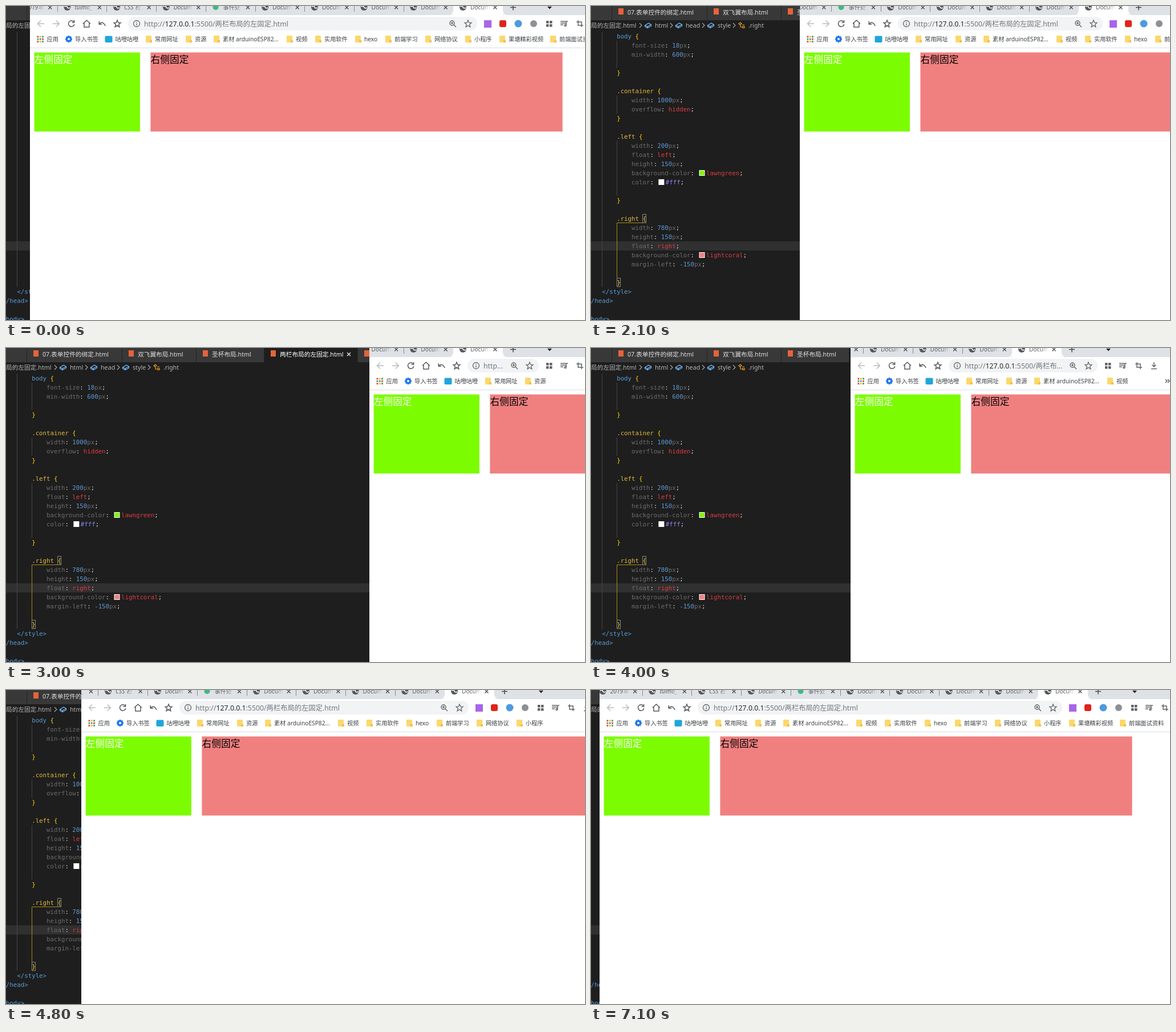
An HTML page with a canvas that plays this animation: 1015x551 px, repeating every 7200 ms.

```html
<!DOCTYPE html>
<html lang="zh">
<head>
<meta charset="utf-8">
<title>两栏布局</title>
<style>
html, body { margin: 0; width: 100%; height: 100%; overflow: hidden; background: #fff; }
canvas { display: block; }
</style>
</head>
<body>
<canvas id="stage" width="1015" height="551"></canvas>
<script>
const W = 1015, H = 551, LOOP = 7200, STEP = 100;
const ctx = document.getElementById('stage').getContext('2d');
const SANS = '"Noto Sans", "Noto Sans CJK SC", sans-serif';
const MONO = '"DejaVu Sans Mono", monospace';

// Left edge of the browser window: [time, x]
const EDGE = [
  [0, 42], [800, 42], [900, 28], [1000, 28], [1100, 42], [1300, 112], [1400, 141], [1600, 141],
  [1700, 155], [1800, 187], [1900, 235], [2000, 295], [2100, 366], [2200, 370], [2400, 373],
  [2500, 400], [2900, 625], [3000, 637], [3600, 637], [4000, 455], [4400, 229],
  [4700, 147], [4800, 132], [5200, 59], [5500, 47], [5600, 40], [6000, 2], [7000, 2], [7100, 15], [7200, 42]
];

function edgeAt(t) {
  const i = Math.max(1, EDGE.findIndex(k => k[0] >= t));
  const [t0, a] = EDGE[i - 1], [t1, b] = EDGE[i];
  return Math.round(a + (b - a) * (t - t0) / (t1 - t0));
}

// While the edge is dragged, right-aligned parts trail by one step
function lagAt(t) {
  const x = edgeAt(t);
  if (t < STEP || t >= 7000 || edgeAt(t + STEP) === x) return 0;
  return x - edgeAt(t - STEP);
}

function rect(x, y, w, h, color) {
  ctx.fillStyle = color;
  ctx.fillRect(x, y, w, h);
}

function text(s, x, y, size, color, font = SANS, style = '') {
  ctx.font = `${style} ${size}px ${font}`;
  ctx.fillStyle = color;
  ctx.fillText(s, x, y);
  return x + ctx.measureText(s).width;
}

function dot(x, y, r, color) {
  ctx.fillStyle = color;
  ctx.beginPath();
  ctx.arc(x, y, r, 0, 7);
  ctx.fill();
}

function pill(x, y, w, h, r, color) {
  ctx.fillStyle = color;
  ctx.beginPath();
  ctx.roundRect(x, y, w, h, r);
  ctx.fill();
}

function stroke(d, x, y, color, width = 1.5) {
  ctx.save();
  ctx.translate(x, y);
  ctx.strokeStyle = color;
  ctx.lineWidth = width;
  ctx.stroke(new Path2D(d));
  ctx.restore();
}

function clipped(x, y, w, h, draw) {
  ctx.save();
  ctx.beginPath();
  ctx.rect(x, y, w, h);
  ctx.clip();
  draw();
  ctx.restore();
}

const ICON = {
  back: 'M6 0H-5M0 -5.5L-5.5 0L0 5.5',
  forward: 'M-6 0H5M0 -5.5L5.5 0L0 5.5',
  reload: 'M4 -3.5A5.2 5.2 0 1 0 5.2 1M5 -6V-2H1',
  home: 'M-6.5 0L0 -6L6.5 0M-4.5 -1V6H4.5V-1',
  undo: 'M-5 -4V1H0M-5 1Q1 -6 6 4',
  star: 'M0 -6L1.8 -1.8L6 -1.6L2.7 1.3L3.8 5.7L0 3.2L-3.8 5.7L-2.7 1.3L-6 -1.6L-1.8 -1.8Z',
  info: 'M5.5 0A5.5 5.5 0 1 1 -5.5 0A5.5 5.5 0 1 1 5.5 0M0 -.5V3M0 -3V-1.8',
  zoom: 'M3 -1A4 4 0 1 1 -5 -1A4 4 0 1 1 3 -1M2 2L6 6M-3 -1H1M-1 -3V1',
  list: 'M-6 -4H3M-6 -1H3M-6 2H-1M4 3V-4H7M4 3A1.5 1.5 0 1 1 1 3A1.5 1.5 0 1 1 4 3',
  crop: 'M-3 -6V3H6M-6 -3H3V6',
  download: 'M0 -6V2M-3.5 -1.5L0 2L3.5 -1.5M-5 5.5H5',
  close: 'M-3 -3L3 3M3 -3L-3 3',
  plus: 'M-5 0H5M0 -5V5',
  chevron: 'M-2 -4L2 0L-2 4',
  more: 'M-3 -3L0 0L-3 3M1 -3L4 0L1 3',
  cube: 'M-5.5 0L1 -4L5.5 -1.5V1L-1 4.5L-5.5 2ZM-5.5 0L-1 2L5.5 -1.5M-1 2V4.5',
  rule: 'M-5 -3L-2 -5L0 -3L-3 -1ZM-2 -1V3H2M1 -1H5M2 1.5H5V4.5H2Z'
};

/* ---------- editor ---------- */

const COL = 6.47, colX = c => c * COL - 6.6, rowY = r => 45 + r * 16;
const CODE = `        body {
            font-size: 18px;
            min-width: 600px;

        }

        .container {
            width: 1000px;
            overflow: hidden;
        }

        .left {
            width: 200px;
            float: left;
            height: 150px;
            background-color: lawngreen;
            color: #fff;

        }

        .right {
            width: 780px;
            height: 150px;
            float: right;
            background-color: lightcoral;
            margin-left: -150px;

        }
    </style>
</head>

<body>`.split('\n');

function codeLine(line, row) {
  const y = rowY(row) + 12;
  let x = colX(line.search(/\S/));
  const put = (s, color) => { x = text(s, x, y, 10.75, color, MONO); };
  const decl = line.match(/^\s*([\w-]+)(: )(.*);$/);
  if (decl) {
    const [, prop, colon, value] = decl;
    put(prop, '#6c6c6c');
    put(colon, '#d4d4d4');
    if (prop.includes('color')) {
      rect(x + 2, y - 9, 10, 10, '#fff');
      rect(x + 3, y - 8, 8, 8, value);
      x += 14.5;
    }
    const num = value.match(/^(-?\d+)(px)$/);
    if (num) {
      put(num[1], '#5f9ad6');
      put(num[2], '#6c6c6c');
    } else {
      put(value, value[0] === '#' ? '#8a86f5' : '#dc3c42');
    }
    put(';', '#d4d4d4');
  } else if (/[<>]/.test(line)) {
    put(line.trim(), '#569cd6');
  } else if (line.includes('{')) {
    const name = line.trim().slice(0, -1);
    put(name, name[0] === '.' ? '#e0b83c' : '#569cd6');
    put('{', '#ffd700');
  } else if (line) {
    put('}', '#ffd700');
  }
}

function editorTab(x, w, label, active) {
  rect(x, 0, w, 25, active ? '#1e1e1e' : '#383838');
  rect(x + 11, 4, 9, 11, '#e5633a');
  text(label, x + 27, 15, 10.7, active ? '#fff' : '#dedede');
  if (active) stroke(ICON.close, x + w - 15, 11, '#eee', 1.2);
}

function editor() {
  rect(0, 0, W, H, '#1e1e1e');
  rect(0, 0, W, 25, '#252526');
  rect(0, 0, 36, 25, '#383838');
  editorTab(37, 166, '07.表单控件的绑定.html');
  editorTab(204, 129, '双飞翼布局.html');
  editorTab(334, 118, '圣杯布局.html');
  editorTab(453, 163, '两栏布局的左固定.html', true);
  editorTab(617, 160, '');

  text('局的左固定.html', 0, 38, 10.7, '#b4b4b4');
  [['html', 112], ['head', 166], ['style', 222], ['.right', 276]].forEach(([s, x], i) => {
    stroke(ICON.chevron, x - 25, 34, '#aaa', 1.1);
    stroke(i < 3 ? ICON.cube : ICON.rule, x - 12, 34, i < 3 ? '#75beff' : '#ee9d28', 1.2);
    text(s, x, 38, 10.7, '#b4b4b4');
  });

  rect(0, rowY(23), W, 16, '#303031');
  rect(19, 45, 1, 448, '#454545');
  [[1, 3], [7, 2], [12, 6]].forEach(([r, n]) => rect(45, rowY(r), 1, n * 16, '#454545'));
  stroke(`M97 380.5H45.5V${rowY(27)}`, 0, 0, '#a88a12', 1);
  [[90, 20], [45, 27]].forEach(([x, r]) => stroke('M.5 .5H6.5V15.5H.5Z', x, rowY(r), '#888', 1));
  CODE.forEach(codeLine);
}

/* ---------- browser ---------- */

const STRIP = '#dee1e6', INK = '#5f6368';
const TABS = ['2019年', 'tulmo_', 'CSS 栏', 'Docum', '事件处', 'Docum', 'Docum', 'Docum', 'Docum', 'Docum'];
const MARKS = [
  ['常用网址', 203], ['资源', 273], ['素材 arduinoESP82...', 322], ['视频', 450], ['实用软件', 500],
  ['hexo', 570], ['前端学习', 623], ['网络协议', 693], ['小程序', 763], ['果塘精彩视频', 823], ['前端面试资料', 912]
];

function globe(x, y) {
  dot(x, y, 6, '#55595e');
  stroke('M-5 -1Q-1 -3 0 0T5 1M-1 -5Q1 -2 4 -3', x, y, '#fff', 1.5);
}

function tabStrip(left, lag) {
  rect(left, 0, W - left, 16, STRIP);
  TABS.forEach((label, i) => {
    const x = 33.7 + i * 86.7 + lag, active = i === TABS.length - 1;
    const bg = active ? '#fff' : STRIP;
    if (active) {
      rect(x - 30, 0, 87, 16, bg);
      stroke('M-34 15.5Q-30 15 -30 10M57 10Q57 15 61 15.5', x, 0, bg, 2);
    } else if (i < TABS.length - 2) {
      rect(Math.round(x + 56), 0, 1, 10, '#85898f');
    }
    if (i === 4) dot(x - 13, 2, 5, '#41b883');
    else globe(x - 13, 2);
    clipped(x, 0, 35, 14, () => text(label, x, 6, 10.2, INK, SANS, i < 4 ? 'italic' : ''));
    const fade = ctx.createLinearGradient(x + 20, 0, x + 35, 0);
    fade.addColorStop(0, bg + (active ? 'f' : 'ff').replace(/f/g, '0'));
    fade.addColorStop(1, bg);
    rect(x + 20, 0, 16, 14, fade);
    stroke(ICON.close, x + 43.5, 2.5, '#50545a', 1.4);
  });
  stroke(ICON.plus, 889 + lag, 2.5, '#45494e', 1.5);
  ctx.fillStyle = '#222';
  ctx.fill(new Path2D(`M${949 + lag} 1h8l-4 4.5z`));
}

function address(x, limit) {
  const parts = [['http://', '#73777c'], ['127.0.0.1', '#26282b'], [':5500/两栏布局的左固定.html', '#73777c']];
  ctx.font = `12.3px ${SANS}`;
  const width = s => ctx.measureText(s).width;
  const full = parts.map(p => p[0]).join('');
  let keep = full.length;
  if (x + width(full) > limit) {
    while (keep > 0 && x + width(full.slice(0, keep) + '...') > limit) keep--;
  }
  const cut = keep < full.length;
  for (const [s, color] of parts) {
    x = text(s.slice(0, Math.max(0, keep)), x, 35.5, 12.3, color);
    keep -= s.length;
  }
  if (cut) text('...', x, 35.5, 12.3, '#73777c');
}

function toolbar(left, lag) {
  const narrow = left - lag > 420;
  const zoomX = (narrow ? 891 : 783) + lag;
  ['back', 'forward', 'reload', 'home', 'undo', 'star'].forEach((name, i) =>
    stroke(ICON[name], left + 19 + i * 26.8, 31, i < 2 ? '#b9bbbe' : '#55595e'));
  pill(left + 172, 19, zoomX + 43 - left - 172, 24, 12, '#f1f3f4');
  stroke(ICON.info, left + 187, 31, INK, 1.3);
  address(left + 200, zoomX - 18);
  stroke(ICON.zoom, zoomX, 31, INK, 1.4);
  stroke(ICON.star, zoomX + 27, 31, INK, 1.3);
  if (!narrow) {
    rect(838 + lag, 25, 13, 13, '#a865ea');
    pill(865 + lag, 25, 12, 12, 3, '#e2231a');
    dot(898 + lag, 31, 6.5, '#4b9be0');
    dot(925 + lag, 31, 6, '#8d9195');
  }
  for (let i = 0; i < 4; i++) rect(947 + lag + i % 2 * 6, 26 + (i >> 1) * 6, 4.5, 4.5, INK);
  stroke(ICON.list, 978 + lag, 31, INK);
  stroke(ICON.crop, 1006 + lag, 31, INK);
  stroke(ICON.download, 1033 + lag, 31, INK);
}

function bookmarks(left, lag) {
  const label = (s, x) => text(s, left + x, 62, 10.2, '#3c4043');
  const hues = ['#ea4335', '#fbbc05', '#34a853', '#4285f4'];
  for (let i = 0; i < 9; i++) {
    rect(left + 12.5 + i % 3 * 4.3, 52.5 + (i / 3 | 0) * 4.3, 2.8, 2.8, hues[(i % 3 + (i / 3 | 0) * 2) % 4]);
  }
  label('应用', 29.5);

  for (let i = 0; i < 4; i++) {
    ctx.save();
    ctx.translate(left + 68, 58);
    ctx.rotate(i * Math.PI / 4);
    rect(-1.5, -6, 3, 12, '#1a73e8');
    ctx.restore();
  }
  dot(left + 68, 58, 4.6, '#1a73e8');
  dot(left + 68, 58, 2, '#fff');
  label('导入书签', 79);

  pill(left + 131.5, 52.5, 13, 11.5, 2, '#20a5dc');
  label('咕噔咕噔', 149.5);

  ctx.font = `10.2px ${SANS}`;
  const shown = MARKS.filter(([s, x]) => left - lag + x + 16 + ctx.measureText(s).width < 1040);
  for (const [s, x] of shown) {
    pill(left + x, 52, 10, 12, 1, '#fbd86b');
    rect(left + x + 7, 60, 4, 4, '#f0c24b');
    label(s, x + 16);
  }
  if (shown.length < MARKS.length) stroke(ICON.more, 1056 + lag, 58, '#444', 1.2);
}

function page(left) {
  rect(left + 7.6, 81.5, 185.3, 138.8, '#7cfc00');
  rect(left + 211.4, 81.5, 722.2, 138.8, '#f08080');
  text('左侧固定', left + 7.8, 99.5, 16.7, '#fff');
  text('右侧固定', left + 211.6, 99.5, 16.7, '#000');
}

function browser(left, lag) {
  clipped(left, 0, W - left, H, () => {
    rect(left, 0, W - left, H, '#fff');
    tabStrip(left, lag);
    toolbar(left, lag);
    bookmarks(left, lag);
    rect(left, 73, W - left, 1, '#dcdee0');
    page(left);
  });
}

function frame(now) {
  const t = Math.floor(now % LOOP / STEP) * STEP;
  editor();
  browser(edgeAt(t), lagAt(t));
  requestAnimationFrame(frame);
}

const start = performance.now();
requestAnimationFrame(function first(now) { frame(Math.max(0, now - start)); });
</script>
</body>
</html>
```
